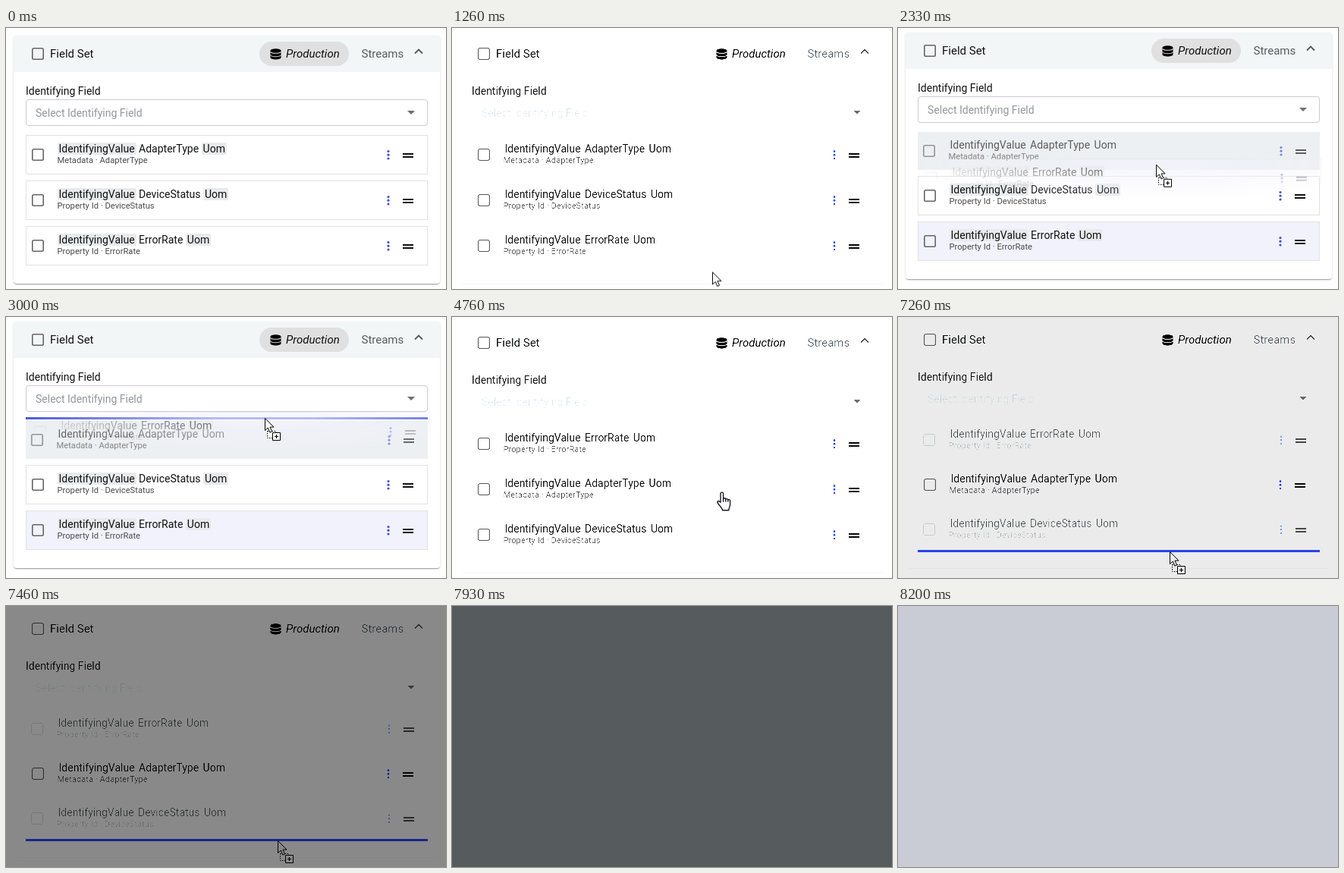
These frames come from a looping animation (580x344 px, 8.23 s). An HTML page:

```html
<!DOCTYPE html>
<html lang="en">
<head>
<meta charset="utf-8">
<title>Field Set</title>
<style>
html, body { margin: 0; width: 100%; height: 100%; overflow: hidden; background: #fff; }
body { font: 14px/16px Roboto, sans-serif; color: #111; }
#stage { position: absolute; left: 0; top: 0; width: 580px; height: 344px; overflow: hidden; }
#stage div, #stage svg, .at { position: absolute; white-space: nowrap; box-sizing: border-box; }
.scene, #veil { left: 0; top: 0; width: 580px; height: 344px; background: #fefefe; }
#veil { background: rgba(0, 0, 0, 0); }
.card {
  left: 10px; top: 10px; width: 562px; height: 327px; border-radius: 4px; background: #fff;
  box-shadow: 0 2px 1px -1px rgba(0,0,0,.2), 0 1px 1px rgba(0,0,0,.14), 0 1px 3px rgba(0,0,0,.12);
}
.drag .card { top: 6px; height: 325px; }
.head { left: 0; top: 0; width: 100%; height: 48px; border-radius: 4px 4px 0 0; background: #f3f6f6; font-size: 15px; line-height: 18px; }
.pill { left: 324px; top: 8px; width: 118px; height: 32px; border-radius: 16px; background: #e0e0e0; }
.select { left: 16px; top: 84px; width: 530px; height: 35px; border: 1px solid #cbcbd3; border-radius: 4px; color: #92979b; }
.check { width: 16px; height: 16px; border-radius: 2.5px; box-shadow: inset 0 0 0 1.6px #666; }
.row { left: 26px; width: 530px; height: 52px; border: 1px solid #e2e2e2; background: #fff; }
.row.lit { background: #f2f2fd; }
.row.dim { height: 50px; border: 0 solid #b14a50; background: #edf0f2; }
.row.dim > * { opacity: .66; }
.row .check { left: 7px; top: 17px; }
.name { left: 40.5px; top: 9px; }
.name span { display: inline-block; padding: 0 2px; border-radius: 2px; background: #e8eaec; }
.dim .name span { background: none; }
.sub { left: 40.5px; top: 26px; font-size: 11.2px; line-height: 14px; color: #4a4a4a; }
.tools { right: 14px; top: 17px; }
.line { left: 26px; width: 530px; height: 3px; background: #4558d6; }
#pointer { left: 0; top: 0; width: 0; height: 0; }
.ghost { width: 530px; height: 52px; }
.ghost .row { left: 0; top: 0; }
#pointer svg { overflow: visible; }
</style>
</head>
<body>
<div id="stage"></div>
<svg width="0" height="0" style="position:absolute">
  <filter id="wash" x="0" y="0" width="1" height="1" color-interpolation-filters="sRGB">
    <feComponentTransfer>
      <feFuncR type="table" tableValues="0 .04 .12 .22 .35 .55 .93 1 1 1 1"/>
      <feFuncG type="table" tableValues="0 .04 .12 .22 .35 .55 .93 1 1 1 1"/>
      <feFuncB type="table" tableValues="0 .04 .12 .22 .35 .55 .93 1 1 1 1"/>
    </feComponentTransfer>
  </filter>
</svg>
<script>
const LOOP = 8230;
const stage = document.getElementById('stage');

const add = (parent, cls, html = '', style = '') => {
  const el = document.createElement('div');
  el.className = cls;
  el.style.cssText = style;
  el.innerHTML = html;
  return parent.appendChild(el);
};

// frames: [time in ms, properties, easing to the next]
const play = (el, frames) => el.animate(
  frames.map(([t, props, easing = 'step-end']) => ({ offset: t / LOOP, easing, ...props })),
  { duration: LOOP, iterations: Infinity });

const show = (el, ...spans) => {
  const frames = spans.flatMap(([from, to]) => [[from, { opacity: 1 }], [to, { opacity: 0 }]]);
  if (spans[0][0] > 0) frames.unshift([0, { opacity: 0 }]);
  play(el, frames);
};

const wash = (el, from) => play(el, [[0, { filter: 'none' }], [from, { filter: 'url(#wash)' }]]);

const KIND = { AdapterType: 'Metadata', DeviceStatus: 'Property Id', ErrorRate: 'Property Id' };

const row = (parent, name, top, cls = '') => add(parent, 'row ' + cls, `
  <div class="check"></div>
  <div class="name"><span>IdentifyingValue</span> ${name} <span>Uom</span></div>
  <div class="sub">${KIND[name]} · ${name}</div>
  <svg class="tools" width="40" height="16">
    <g fill="#4050d4"><circle cx="3" cy="3.5" r="1.6"/><circle cx="3" cy="8.2" r="1.6"/><circle cx="3" cy="13" r="1.6"/></g>
    <path d="M22 7h14M22 11h14" stroke="#111" stroke-width="2"/>
  </svg>`, `top:${top}px`);

const CARD = `
  <div class="head">
    <div class="check" style="left:24px;top:16px"></div>
    <div style="left:48px;top:15px">Field Set</div>
    <div class="pill"></div>
    <svg style="left:338px;top:17px" width="15" height="15">
      <path d="M.5 3v9c0 3.3 14 3.3 14 0V3z"/><ellipse cx="7.5" cy="3" rx="7" ry="2.7"/>
      <path d="M.5 4.2c1 2.8 13 2.8 14 0M.5 8.6c1 2.8 13 2.8 14 0" fill="none" stroke="#e0e0e0" stroke-width="1.1"/>
    </svg>
    <i class="at" style="left:359px;top:15px">Production</i>
    <div style="left:458.5px;top:15px;color:#555b60">Streams</div>
    <svg style="left:528px;top:16px" width="12" height="10"><path d="M1 7.5l5-5 5 5" fill="none" stroke="#555" stroke-width="1.8"/></svg>
  </div>
  <div style="left:16px;top:65px">Identifying Field</div>
  <div class="select">
    <div style="left:12px;top:9px">Select Identifying Field</div>
    <svg style="left:502px;top:14px" width="10" height="5"><path d="M0 0h10l-5 5z" fill="#707070"/></svg>
  </div>`;

const scene = (from, to, tops, names, looks = []) => {
  const el = add(stage, 'scene' + (looks.length ? ' drag' : ''));
  add(el, 'card', CARD);
  const rows = names.map((name, i) => row(el, name, tops[i], looks[i]));
  show(el, [from, to]);
  return { el, rows };
};

const IDLE = [141, 201, 261], DRAG = [137, 195, 255];
const before = ['AdapterType', 'DeviceStatus', 'ErrorRate'];
const after = ['ErrorRate', 'AdapterType', 'DeviceStatus'];

const first = scene(0, 2060, IDLE, before);
wash(first.el, 30);

const lift = scene(2060, 3760, DRAG, before, ['dim', '', 'lit']);
show(add(lift.el, 'line', '', 'top:132px'), [2700, 3760]);

const second = scene(3760, 5130, IDLE, after);
wash(second.el, 3760);

const lower = scene(5130, 7727, DRAG, after, ['dim', 'lit', 'dim']);
wash(lower.el, 7260);
show(add(lower.el, 'line', '', 'top:307px'), [6300, 7727]);
play(lower.rows[2], [
  [0, { borderLeftWidth: '0px' }],
  [5960, { borderLeftWidth: '5px' }],
  [6300, { borderLeftWidth: '0px' }]
]);

// Everything below is placed relative to the pointer's hot spot
const pointer = add(stage, '');
pointer.id = 'pointer';

const ghost = (name, x, y, from, to) => {
  const mask = `radial-gradient(ellipse 330px 46px at ${-x}px ${-y}px, rgba(0,0,0,.65) 20%, transparent)`;
  const el = add(pointer, 'ghost', '', `left:${x}px;top:${y}px;-webkit-mask-image:${mask};mask-image:${mask}`);
  row(el, name, 0, 'lit');
  show(el, [from, to]);
};
ghost('ErrorRate', -312, -8, 2060, 3760);
ghost('AdapterType', -333, -17, 5130, 7260);

const glyph = (svg, ...spans) => show(add(pointer, '', `<svg width="24" height="32">${svg}</svg>`), ...spans);
const ARROW = '<path d="M.5.5v16l3.8-3.4 2.6 6 2.7-1.2-2.6-5.8h5z" fill="#fff" stroke="#000"/>';
const BAN = '<circle r="7.5"/><path d="M-5.3-5.3L5.3 5.3"/>';

glyph(ARROW, [0, 1400], [3760, 3950]);
glyph(`<path d="M3.5 17.5h11v9h-11z" fill="#fff" stroke="#000" stroke-dasharray="1.5 1.5"/>${ARROW}
  <path d="M10.5 19.5h10v10h-10z" fill="#fff" stroke="#000"/><path d="M13 24.5h5M15.5 22v5" stroke="#000" stroke-width="1.2"/>`,
  [2270, 3760], [6300, 7727]);
glyph(`<path transform="translate(-7 .3)" fill="#fff" stroke="#1a1a2a" stroke-width="1.4" stroke-linejoin="round"
  d="M5 14V2.6a1.8 1.8 0 0 1 3.6 0V10a1.6 1.6 0 0 1 3.2 0v.8a1.5 1.5 0 0 1 3 0v.9a1.4 1.4 0 0 1 2.8 0V17c0 3-1.8 4-1.8 7.5H7.5C7.5 21 2 17.5 1 14c-.4-1.6 1.5-2.4 2.6-1zM8.6 10v3.5M11.8 10.8v2.7M14.8 11.7v1.8"/>`,
  [1400, 2060], [3950, 5130]);
glyph(`<g fill="none"><g stroke="#fff" stroke-width="4.6">${BAN}</g><g stroke="#000" stroke-width="2.6">${BAN}</g></g>`,
  [2060, 2270], [5130, 6300]);

const at = (x, y) => ({ transform: `translate(${x}px, ${y}px)` });
play(pointer, [
  [0, at(345, 360)],
  [1130, at(345, 344), 'ease-out'],
  [1800, at(338, 269)],
  [2060, at(338, 269), 'linear'],
  [2330, at(340, 180), 'ease-out'],
  [2860, at(341, 114)],
  [2930, at(341, 120), 'ease-out'],
  [3000, at(341, 133)],
  [3900, at(341, 133), 'ease-in-out'],
  [4560, at(356, 231)],
  [4760, at(356, 230), 'ease-in-out'],
  [4960, at(358, 217)],
  [5130, at(358, 217), 'ease-in-out'],
  [5930, at(362, 290), 'linear'],
  [6030, at(362, 291), 'ease-in-out'],
  [6530, at(358, 309)]
]);

const veil = add(stage, '');
veil.id = 'veil';
const tint = backgroundColor => ({ backgroundColor });
play(veil, [
  [0, tint('rgba(0,0,0,0)')],
  [7221, tint('rgba(0,0,0,0)'), 'steps(13)'],
  [7726, tint('rgb(0,0,0)'), 'steps(3)'],
  [7929, tint('rgb(86,91,93)'), 'steps(4)'],
  [8200, tint('rgb(201,204,213)')]
]);
</script>
</body>
</html>
```
